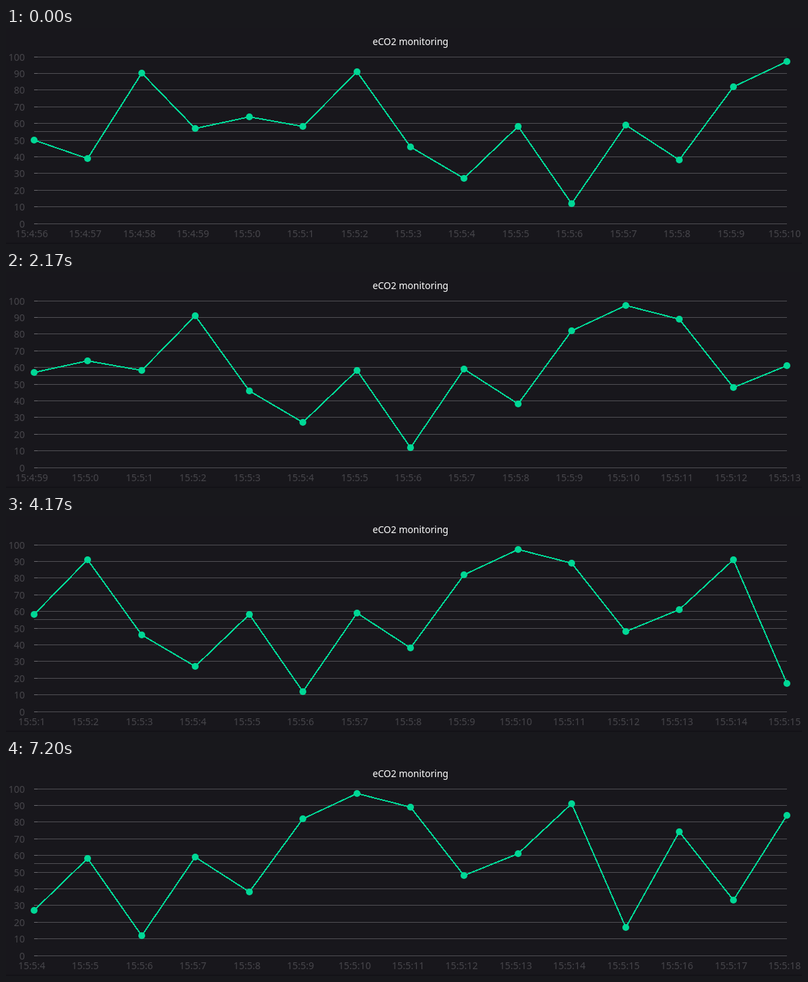
An HTML page that plays this animation: 1161x316 px, repeating every 8 s.

```html
<!DOCTYPE html>
<html lang="en">
<head>
<meta charset="utf-8">
<title>eCO2 monitoring</title>
<style>
  html, body { margin: 0; width: 100%; height: 100%; overflow: hidden; background: #18171c; }
  svg { display: block; width: 1161px; height: 316px; }
  text { font: 14px "Noto Sans", "Open Sans", sans-serif; fill: #47464b; }
  .title { font-size: 13.7px; fill: #fff; }
  .mid { text-anchor: middle; }
  .end { text-anchor: end; }
  .grid { fill: #4f4e53; }
  .tick { fill: #69686d; }
  .edge { fill: #131217; }
  .line { fill: none; stroke: #00d896; stroke-width: 2; shape-rendering: crispEdges; }
  .dot { fill: #00d896; }
</style>
</head>
<body>
<svg id="chart" viewBox="0 0 1161 316"></svg>
<script>
  const LOOP = 8000;
  const STEPS = [170, 1200, 2170, 3170, 4170, 5200, 6170, 7200];
  const VALUES = [50, 39, 90, 57, 64, 58, 91, 46, 27, 58, 12, 59,
                  38, 82, 97, 89, 48, 61, 91, 17, 74, 33, 84];
  const COUNT = 15, LEFT = 41, RIGHT = 1139, TOP = 42, BOTTOM = 286;
  const START = 4 * 60 + 56; // seconds past 15:00

  const chart = document.getElementById('chart');
  const xAt = i => Math.round(LEFT + (RIGHT - LEFT) * i / (COUNT - 1));
  const yAt = v => BOTTOM - (BOTTOM - TOP) * v / 100;

  function add(tag, attrs, text) {
    const el = document.createElementNS('http://www.w3.org/2000/svg', tag);
    for (const key in attrs) el.setAttribute(key, attrs[key]);
    if (text !== undefined) el.textContent = text;
    return chart.appendChild(el);
  }

  function bar(cls, x, y, width, height = 1) {
    add('rect', { class: cls, x, y, width, height });
  }

  bar('edge', 0, 314, 1161, 2);
  add('text', { class: 'title mid', x: 590, y: 25 }, 'eCO2 monitoring');
  bar('grid', LEFT, Math.floor(yAt(55)), RIGHT - LEFT);
  for (let v = 0; v <= 100; v += 10) {
    const y = Math.floor(yAt(v));
    bar('grid', LEFT, y, RIGHT - LEFT);
    bar('tick', LEFT, y, 5);
    add('text', { class: 'end', x: 27.5, y: y + 6 }, v);
  }

  const line = add('polyline', { class: 'line' });
  const dots = [], labels = [];
  for (let i = 0; i < COUNT; i++) {
    dots.push(add('circle', { class: 'dot', cx: xAt(i), r: 5 }));
    labels.push(add('text', { class: 'mid', x: xAt(i) - 3.5, y: 306 }));
  }

  function show(first) {
    const points = dots.map((dot, i) => {
      const y = Math.round(yAt(VALUES[first + i]));
      const sec = START + first + i;
      dot.setAttribute('cy', y);
      labels[i].textContent = `15:${Math.floor(sec / 60)}:${sec % 60}`;
      return `${xAt(i)},${y}`;
    });
    line.setAttribute('points', points.join(' '));
  }

  let shown = -1;
  function tick() {
    const t = performance.now() % LOOP;
    const first = STEPS.filter(s => t >= s).length;
    if (first !== shown) show(shown = first);
    requestAnimationFrame(tick);
  }
  tick();
</script>
</body>
</html>
```
